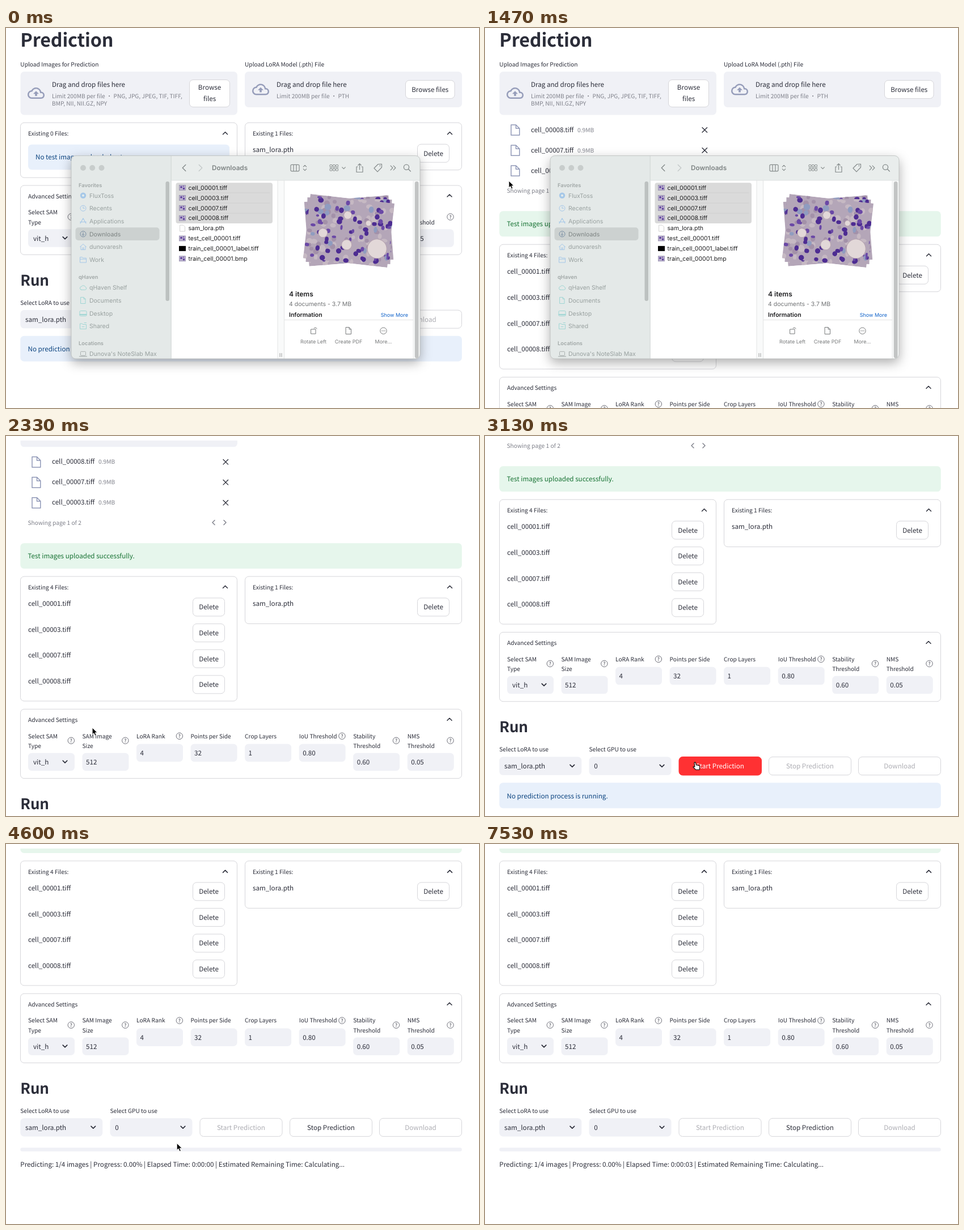
These frames come from a looping animation (834x671 px, 7.94 s). An HTML page:

```html
<!DOCTYPE html>
<html lang="en">
<head>
<meta charset="utf-8">
<title>Prediction</title>
<style>
  html, body { margin: 0; width: 100%; height: 100%; overflow: hidden; background: #fff; }
  svg { display: block; position: absolute; left: 0; top: 0; }
  text {
    font: 11.65px "Noto Sans CJK SC", "Noto Sans CJK JP", "Noto Sans CJK", "Noto Sans CJK KR", sans-serif;
    fill: #2b2d39; text-rendering: geometricPrecision; white-space: pre;
  }
  text.s { font-size: 10.2px; }
  text.grey { fill: #7f808a; }
  text.off { fill: #adadb3; }
  text.mid { text-anchor: middle; }
  text.h1 { font-size: 32.3px; font-weight: 700; letter-spacing: -.005em; }
  text.h2 { font-size: 26px; font-weight: 700; letter-spacing: -.005em; }
  text.info { fill: #0b437f; }
  text.ok { fill: #177233; }
  text.mac { font: 10.5px Inter, "Liberation Sans", sans-serif; fill: #1d1d1f; }
  text.side { fill: #98a09f; }
  text.head { font-size: 9.3px; font-weight: 600; fill: #a0a7a6; }
  text.tiny { font-size: 9px; fill: #77797a; }
  text.bold { font-weight: 600; }
  .line { fill: none; stroke-linecap: round; stroke-linejoin: round; }
</style>
</head>
<body>
<svg id="stage" width="834" height="671" viewBox="0 0 834 671"></svg>
<script>
const LOOP = 7940, FRAME = 200 / 3;
const INK = '#2b2d39', EDGE = '#d6d6da', FIELD = '#f0f1f6';

// ---- drawing helpers ----
const text = (x, y, str, cls = '', attr = '') => `<text x="${x}" y="${y}" class="${cls}" ${attr}>${str}</text>`;
const rect = (x, y, w, h, fill, r = 6.5, attr = '') =>
  `<rect x="${x}" y="${y}" width="${w}" height="${h}" rx="${r}" fill="${fill}" ${attr}/>`;
const line = (d, color = INK, w = 1, attr = '') => `<path class="line" d="${d}" stroke="${color}" stroke-width="${w}" ${attr}/>`;
const circle = (x, y, r, fill, attr = '') => `<circle cx="${x}" cy="${y}" r="${r}" fill="${fill}" ${attr}/>`;
const group = (body, id = '', attr = '') => `<g ${id && `id="${id}"`} ${attr}>${body}</g>`;
const move = (x, y, body) => group(body, '', `transform="translate(${x} ${y})"`);
const card = (x, y, w, h) => rect(x, y, w, h, '#fff', 6.5, `stroke="${EDGE}"`);
const chevron = (x, y, turn = 0, color = INK, size = 4, w = 1.5) =>
  line(`M${-size} ${size / 2}L0 ${-size / 2}L${size} ${size / 2}`, color, w, `transform="translate(${x} ${y}) rotate(${turn})"`);
const button = (x, y, w, label, cls = '', h = 32) => card(x, y, w, h) + text(x + w / 2, y + h / 2 + 4.4, label, 'mid ' + cls);

// ---- web page ----
const cloud = (x, y) => `<path transform="translate(${x} ${y}) scale(1.25)" fill="#969dba" d="M19.35 10.04A7.49 7.49 0 0 0 12 4C9.11 4 6.6 5.64 5.35 8.04A5.99 5.99 0 0 0 0 14c0 3.31 2.69 6 6 6h13c2.76 0 5-2.24 5-5 0-2.64-2.05-4.78-4.65-4.96zM19 18H6c-2.21 0-4-1.79-4-4 0-2.05 1.53-3.76 3.56-3.97l1.07-.11.5-.95A5.47 5.47 0 0 1 12 6c2.62 0 4.88 1.86 5.39 4.43l.3 1.5 1.53.11A2.98 2.98 0 0 1 22 15c0 1.65-1.35 3-3 3zM8 13h2.55v3h2.9v-3H16l-4-4z"/>`;

const uploads = () =>
  text(25.3, 32.5, 'Prediction', 'h1') +
  text(25.3, 67.5, 'Upload Images for Prediction', 's') + text(421, 67.5, 'Upload LoRA Model (.pth) File', 's') +
  rect(25.5, 77, 382.5, 76.5, FIELD) + rect(421, 77, 383, 63, FIELD) +
  cloud(38, 100) + cloud(434, 93.5) +
  text(81, 104.2, 'Drag and drop files here') + text(477, 104.2, 'Drag and drop file here') +
  text(81, 123.5, 'Limit 200MB per file • PNG, JPG, JPEG, TIF, TIFF,', 's grey') +
  text(81, 137, 'BMP, NII, NII.GZ, NPY', 's grey') + text(477, 123.5, 'Limit 200MB per file • PTH', 's grey') +
  card(323.5, 91.5, 71, 48) + text(359, 109.4, 'Browse', 'mid') + text(359, 129.4, 'files', 'mid') +
  button(704.5, 92.5, 86.5, 'Browse files');

const fileList = () => [8, 7, 3].map((n, i) => move(0, 36 * i,
  line('M46 171h8.5l6.3 6.3v12h-14.8zM54.5 171v6.3h6.3', '#9199b8', 1.5) +
  text(81, 183.5, `cell_0000${n}.tiff`) + text(163, 183.5, '0.9MB', 's grey') +
  line('M383 175.7l8.6 8.6M391.6 175.7l-8.6 8.6', INK, 1.3))).join('') +
  text(38.5, 290.7, 'Showing page 1 of 2', 's grey') +
  chevron(366, 287, -90, '#80828c') + chevron(386, 287, 90, '#80828c');

const existing = (x, count, h, body) =>
  card(x, .5, 382, h) + text(x + 13.5, 23.2, `Existing ${count} Files:`, 's') + chevron(x + 361, 19) + body;
const stored = (x, name) => text(x + 13.5, 52.7, name) + button(x + 304, 38.5, 56, 'Delete');

function field(i, lines, value, help) {
  const x = 39 + 95.53 * i, two = lines.length > 1, top = two ? 77.3 : 61.3, pick = i === 0;
  const hx = x + 75.8, hy = two ? 55.5 : 47.5;
  return lines.map((s, n) => text(x, 51.2 + 17.5 * n, s, 's')).join('') +
    rect(x, top, 82, 31.5, FIELD) + text(x + (pick ? 9 : 6.5), top + 20.2, value) +
    (pick ? chevron(x + 65, top + 15.5, 180, INK, 3.8, 1.7) : '') +
    (help ? circle(hx, hy, 5.7, 'none', 'stroke="#6d6e78"') + text(hx, hy + 3.1, '?', 's mid', 'style="font-size:8.5px"') : '');
}

const settings = () => card(25.5, 0, 778, 122.3) + text(39, 22.7, 'Advanced Settings', 's') + chevron(782, 18) +
  [[['Select SAM', 'Type'], 'vit_h', 1], [['SAM Image', 'Size'], '512', 1], [['LoRA Rank'], '4', 1],
   [['Points per Side'], '32'], [['Crop Layers'], '1'], [['IoU Threshold'], '0.80', 1],
   [['Stability', 'Threshold'], '0.60', 1], [['NMS', 'Threshold'], '0.05', 1]]
    .map(([lines, value, help], i) => field(i, lines, value, help)).join('');

const select = (x, label, value) => text(x, 210.7, label, 's') + rect(x, 220, 145, 32.3, FIELD) +
  text(x + 8.7, 240.6, value) + chevron(x + 128.5, 236, 180, INK, 3.8, 1.7);

const run = () => text(25.3, 176.8, 'Run', 'h2') +
  select(25.3, 'Select LoRA to use', 'sam_lora.pth') + select(183.5, 'Select GPU to use', '0') +
  button(658.5, 220.2, 145, 'Download', 'off') +
  group(rect(342, 220, 145.5, 32.5, '#ff4b4b', 6.5, 'id="start" stroke="#ff4b4b"') +
    text(414.5, 240.6, 'Start Prediction', 'mid', 'id="startText"') +
    button(500.5, 220.2, 145, 'Stop Prediction', 'off') +
    rect(25.3, 265.7, 778.5, 45, '#e8f0fb') + text(38.5, 293, 'No prediction process is running.', 'info'), 'idle') +
  group(button(342, 220.2, 145, 'Start Prediction', 'off') + button(500.5, 220.2, 145, 'Stop Prediction') +
    rect(25.3, 272, 778.5, 6.5, FIELD, 3.2) +
    text(25.3, 306.2, 'Predicting: 1/4 images | Progress: 0.00% | Elapsed Time: 0:00:0<tspan id="secs">0</tspan> | Estimated Remaining Time: Calculating...'), 'busy');

const page = () => group(uploads() +
  group(fileList(), 'list') +
  group(rect(25.3, 323.3, 778.5, 45, '#e6f6ec') + text(38.5, 350.4, 'Test images uploaded successfully.', 'ok'), 'done') +
  group(existing(25.5, 0, 97, rect(39, 39, 355, 44.5, '#e8f0fb') +
    text(52, 65.6, 'No test images uploaded yet.', 'info')), 'none') +
  group(existing(25.5, 4, 220, [1, 3, 7, 8].map((n, i) => move(0, 45.6 * i, stored(25.5, `cell_0000${n}.tiff`))).join('')), 'four') +
  group(existing(421.5, 1, 83.5, stored(421.5, 'sam_lora.pth')), 'model') +
  group(settings() + run(), 'lower'), 'page') + rect(0, 0, 834, 8, '#fff', 0, 'id="topbar"');

// ---- file window ----
let seed = 7;
const rnd = () => (seed = seed * 16807 % 2147483647) / 2147483647;

function photo(angle) {
  const spot = (fill, min, max) => `<ellipse cx="${rnd() * 149 - 74}" cy="${rnd() * 114 - 57}" rx="${min + rnd() * (max - min)}" ry="${min + rnd() * (max - min)}" fill="${fill}"/>`;
  const many = (n, ...a) => Array.from({ length: n }, () => spot(...a)).join('');
  const blobs = [[53, 26, 17], [-45, 9, 8], [-1, 25, 9], [-5, -27, 7], [33, -17, 5]];
  return group(group(rect(-75, -57, 150, 114, '#b4a6b8', 0) +
    many(45, '#c6b9c3', 3, 6) + many(30, '#a391a9', 3, 5) + many(12, '#8f9cc0', 3, 6) +
    many(36, '#4d2c92', 3, 5) + many(26, '#6a48a6', 2, 4.5) +
    blobs.map(([x, y, r]) => circle(x, y, r, '#e2d8d8', 'stroke="#b7a4b0"')).join(''), '', 'clip-path="url(#photo)"'),
    '', `transform="translate(604.5 358) rotate(${angle})"`);
}

const thumb = y => rect(305.5, y - 4.5, 11, 9, '#b9b0cc', 0, 'stroke="#8d86a8" stroke-width=".7"') +
  circle(309, y - 1, 1.8, '#5c3d9c') + circle(313.5, y + 1.5, 1.7, '#5c3d9c') + circle(313, y - 2.5, 1, '#6a48a6');
const fileRow = (y, name, icon = thumb) => icon(y) + text(321.5, y + 3.7, name, 'mac');
const cells = () => [1, 3, 7, 8].map((n, i) => fileRow(282 + 17.9 * i, `cell_0000${n}.tiff`)).join('');

const BLUE = '#a6c8e8', TEAL = '#9fd6d4';
const glyph = {
  waves: circle(0, 0, 5.2, BLUE) + circle(0, 0, 2, '#e6ebea'),
  clock: circle(0, 0, 5, 'none', `stroke="${BLUE}"`) + line('M0 -3V0H2.5', BLUE),
  apps: line('M-5 4L0 -5L5 4M-5.5 1.5H5.5', BLUE, 1.1),
  down: circle(0, 0, 5, 'none', 'stroke="#8fa9c4"') + line('M0 -2.7V2.5M-2 .7L0 2.7L2 .7', '#8fa9c4'),
  home: line('M-5.5 0L0 -5L5.5 0M-4 -1V5H4V-1M-1 5V1.5H1V5', BLUE),
  folder: line('M-5.5 4.5V-4.5H-1.5L-.5 -3H5.5V4.5ZM-5.5 -1H5.5', BLUE),
  cloud: line('M-3.5 4H3.5A2.6 2.6 0 0 0 4 -1A4 4 0 0 0 -3 -1.8A3 3 0 0 0 -3.5 4Z', TEAL),
  doc: line('M-4 -5.5H1L4 -2.5V5.5H-4ZM1 -5.5V-2.5H4', TEAL),
  desk: rect(-6, -4.5, 12, 9, 'none', 1.5, `stroke="${TEAL}"`) + line('M-5.5 2H5.5', TEAL, 2),
  share: line('M-5.5 4.5V-4.5H-1.5L-.5 -3H5.5V4.5ZM2 -6H5.5M-2 1H2', TEAL),
  laptop: rect(-4.5, -4, 9, 7, 'none', 1, 'stroke="#aab1b0"') + line('M-6.5 4.5H6.5', '#aab1b0', 1.3),
};
const item = (y, icon, label) => move(136, y, glyph[icon]) + text(147, y + 3.8, label, 'mac side');

const sidebar = () => [136, 152.2, 168.5].map(x => circle(x, 247, 5, '#c8cdcc')).join('') +
  text(128, 280.6, 'Favorites', 'mac head') + rect(122.5, 352.3, 148, 22.7, '#ccd1d0', 5) +
  item(295.7, 'waves', 'FluxToss') + item(318.3, 'clock', 'Recents') + item(341, 'apps', 'Applications') +
  group(item(363.8, 'down', 'Downloads'), '', 'style="filter:brightness(.82)"') +
  item(386.5, 'home', 'dunovaresh') + item(409.2, 'folder', 'Work') +
  text(128, 443.4, 'qHaven', 'mac head') + item(458.3, 'cloud', 'qHaven Shelf') + item(481, 'doc', 'Documents') +
  item(504, 'desk', 'Desktop') + item(526.5, 'share', 'Shared') +
  text(128, 560.4, 'Locations', 'mac head') + item(575.3, 'laptop', 'Dunova\'s NoteSlab Max') +
  rect(281.5, 271, 6.5, 211, '#bcc1c0', 3.2);

function toolbar() {
  const c = '#868c8c';
  return chevron(314, 247, -90, c, 5.5, 1.5) + chevron(343, 247, 90, '#c5caca', 5.5, 1.5) +
    text(363, 251.2, 'Downloads', 'mac bold', 'style="font-size:11.7px;fill:#7d8383"') +
    rect(502, 241.3, 15, 11.5, 'none', 2, `stroke="${c}" stroke-width="1.2"`) + line('M507 241.5V252.5M512 241.5V252.5', c, 1.2) +
    chevron(527, 243.8, 0, c, 2.7, 1.2) + chevron(527, 250.2, 180, c, 2.7, 1.2) +
    [571, 576.3, 581.6].map(x => rect(x, 241.5, 4, 3.6, 'none', .8, `stroke="${c}"`) + rect(x, 248.5, 4, 3.6, 'none', .8, `stroke="${c}"`)).join('') +
    line('M571 246.8H586', c, .8) + chevron(595.5, 247.3, 180, c, 2.8, 1.2) +
    line('M620 245H618V254.5H629V245H627M623.5 250V240M620.8 242.3L623.5 239.7L626.2 242.3', c, 1.2) +
    line('M649 247.5L656 240.5L662.5 240.3L662.5 246L655 253.8Z', c, 1.2) + circle(659.5, 243.3, 1, c) +
    chevron(680, 247, 90, c, 3.8, 1.2) + chevron(685, 247, 90, c, 3.8, 1.2) +
    circle(706, 245.7, 4.6, 'none', `stroke="${c}" stroke-width="1.3"`) + line('M709.5 249.2L713.3 253', c, 1.4);
}

const preview = () => photo(-4.5) + photo(1.5) + photo(6.5) +
  text(499, 474, '4 items', 'mac bold', 'style="font-size:12px"') +
  text(499, 490.7, '4 documents - 3.7 MB', 'mac', 'style="fill:#707274"') +
  text(499, 510, 'Information', 'mac bold') +
  text(709, 509.8, 'Show More', 'mac tiny', 'text-anchor="end" style="fill:#0f62c9"') + line('M491 515.5H718', '#e4e4e4') +
  line('M538 532H546V540H538ZM543 530Q546.5 527.5 548 531', '#77797a') +
  line('M599.5 528.5H605L608.5 532V540.5H599.5ZM605 528.5V532H608.5', '#77797a') +
  circle(665.5, 534.7, 5.7, 'none', 'stroke="#77797a"') + [-2.5, 0, 2.5].map(d => circle(665.5 + d, 534.7, .8, '#77797a')).join('') +
  text(542, 557.2, 'Rotate Left', 'mac tiny mid') + text(604, 557.2, 'Create PDF', 'mac tiny mid') + text(665.5, 557.2, 'More...', 'mac tiny mid');

const finder = () => group(
  rect(115, 225.5, 615, 358.5, '#fff', 8, 'class="shadow" style="filter:drop-shadow(0 7px 10px rgba(0,0,0,.32))"') +
  group(rect(115, 225, 176, 360, '#e4e9e8', 0) + rect(291, 225, 440, 44, '#e9edec', 0) +
    rect(479, 269, 11.5, 316, '#f9fafa', 0) + rect(718, 269, 12, 316, '#f8f9f9', 0) +
    line('M291.2 226V584', '#cfd4d3') + line('M291 269H730', '#dde1e0') +
    line('M479 269V584M490.5 269V584', '#e2e4e4') + line('M718 269V584', '#e8eaea') +
    rect(720.8, 271, 6.8, 312, '#c2c4c4', 3.4) + line('M483 574.5V580.5M486 574.5V580.5', '#9b9d9d') +
    sidebar() + toolbar() +
    rect(299.5, 273.3, 170.5, 71.7, '#dadada', 4) + [291, 309, 327].map(y => line(`M320 ${y}H465`, '#cccccc', .8)).join('') + cells() +
    fileRow(353.6, 'sam_lora.pth', y => line(`M307 ${y - 5.5}H312.5L315.5 ${y - 2.5}V${y + 5.5}H307Z`, '#d2d2d2')) +
    fileRow(371.5, 'test_cell_00001.tiff') +
    fileRow(389.4, 'train_cell_00001_label.tiff', y => rect(305, y - 4.5, 12, 9, '#000', 0)) +
    fileRow(407.3, 'train_cell_00001.bmp') + preview(), '', 'clip-path="url(#win)"') +
  rect(115, 225.5, 615, 358.5, 'none', 8, 'stroke="#b9bdbc" stroke-width=".8"'), 'finder');

const pointers = () =>
  group(`<path d="M0 0V12.2L2.8 9.6L4.9 14.2L7.1 13.2L5.1 8.8H9Z" fill="#000" stroke="#fff" stroke-width=".9"/>`, 'arrow') +
  group(`<path d="M-1 .8Q.3 -.6 1.4 .8L2.4 5.2Q4 4 5 5.6Q6.5 4.8 7.2 6.2Q9 6 8.8 8.3L8.2 13.3H1.6L-3 8.6Q-2.6 6.8 -.1 8.2Z" fill="#fff" stroke="#000" stroke-width="1.1" stroke-linejoin="round"/>`, 'hand');

stage.innerHTML = `<defs><clipPath id="photo"><rect x="-74.5" y="-57" width="149" height="114"/></clipPath>
  <clipPath id="win"><rect x="115" y="225.5" width="615" height="358.5" rx="8"/></clipPath></defs>` +
  page() + finder() + group(cells(), 'ghost', 'opacity=".6"') + pointers();

// ---- motion: rows of time, then values ----
const SCROLL = [[2000, 0], [2067, 12], [2200, 62], [2333, 134], [2467, 200], [2600, 243], [2800, 270], [4000, 270], [4067, 300], [4133, 336], [4200, 352.3]];
const DRAG = [[0, 0, 0], [400, -120, -135], [667, -245, -275], [800, -248, -255]];
const CURSOR = [[0, 345, 337], [400, 225, 202], [667, 100, 62], [800, 97, 82], [1067, 97, 82], [1400, 42, 268], [1467, 42, 270],
  [1667, 42, 270], [1933, 92, 420], [2067, 104, 450], [2333, 152, 515], [2800, 309, 577], [3133, 370, 576], [3733, 370, 576],
  [3867, 374, 548], [4533, 374, 548], [4800, 84, 470], [5333, 508, 418], [5600, 726, 66]];

function at(track, t) {
  const i = track.findIndex(row => row[0] > t);
  if (i < 0) return track[track.length - 1].slice(1);
  if (i === 0) return track[0].slice(1);
  const a = track[i - 1], b = track[i], k = (t - a[0]) / (b[0] - a[0]);
  return a.slice(1).map((v, n) => v + (b[n + 1] - v) * k);
}

const el = id => document.getElementById(id);
const show = (id, on) => { el(id).style.display = on ? '' : 'none'; };
const place = (id, x, y) => el(id).setAttribute('transform', `translate(${x} ${y})`);

function render(now) {
  const t = now % LOOP;
  const q = Math.floor((t + 4) / FRAME) * FRAME + 1;
  const listed = q >= 1000, saved = q >= 1267, busy = q >= 3733;

  show('list', listed); show('done', saved);
  show('none', !saved); show('four', saved);
  place('none', 0, listed ? 323 : 166.7);
  place('four', 0, 381.7);
  place('model', 0, saved ? 381.7 : 166.7);
  place('lower', 0, saved ? 616.5 : listed ? 434.5 : 278);
  show('idle', !busy); show('busy', busy);
  el('secs').textContent = q < 5133 ? 0 : q < 6333 ? 1 : q < 7533 ? 2 : 3;

  const [scroll] = at(SCROLL, q - 1);
  place('page', 0, -scroll);
  show('topbar', scroll > 0);
  show('finder', q < 2067);

  show('ghost', q > 66 && q < 1000);
  place('ghost', ...at(DRAG, q - 1));

  const [x, y] = at(CURSOR, q - 1);
  const over = q > 2800 && !busy && x > 342, pressed = q > 3333 && q < 3466;
  show('arrow', q > 66 && q < 5600 && !over); show('hand', over);
  place('arrow', x, y); place('hand', x, y);
  el('start').setAttribute('fill', pressed ? '#fff' : over ? '#ff3133' : '#ff4b4b');
  el('start').setAttribute('stroke', over && !pressed ? '#ff3133' : '#ff4b4b');
  el('startText').style.fill = pressed ? '#ff4b4b' : '#fff';
}

const begin = performance.now();
function tick() {
  render(performance.now() - begin);
  requestAnimationFrame(tick);
}
tick();
</script>
</body>
</html>
```
